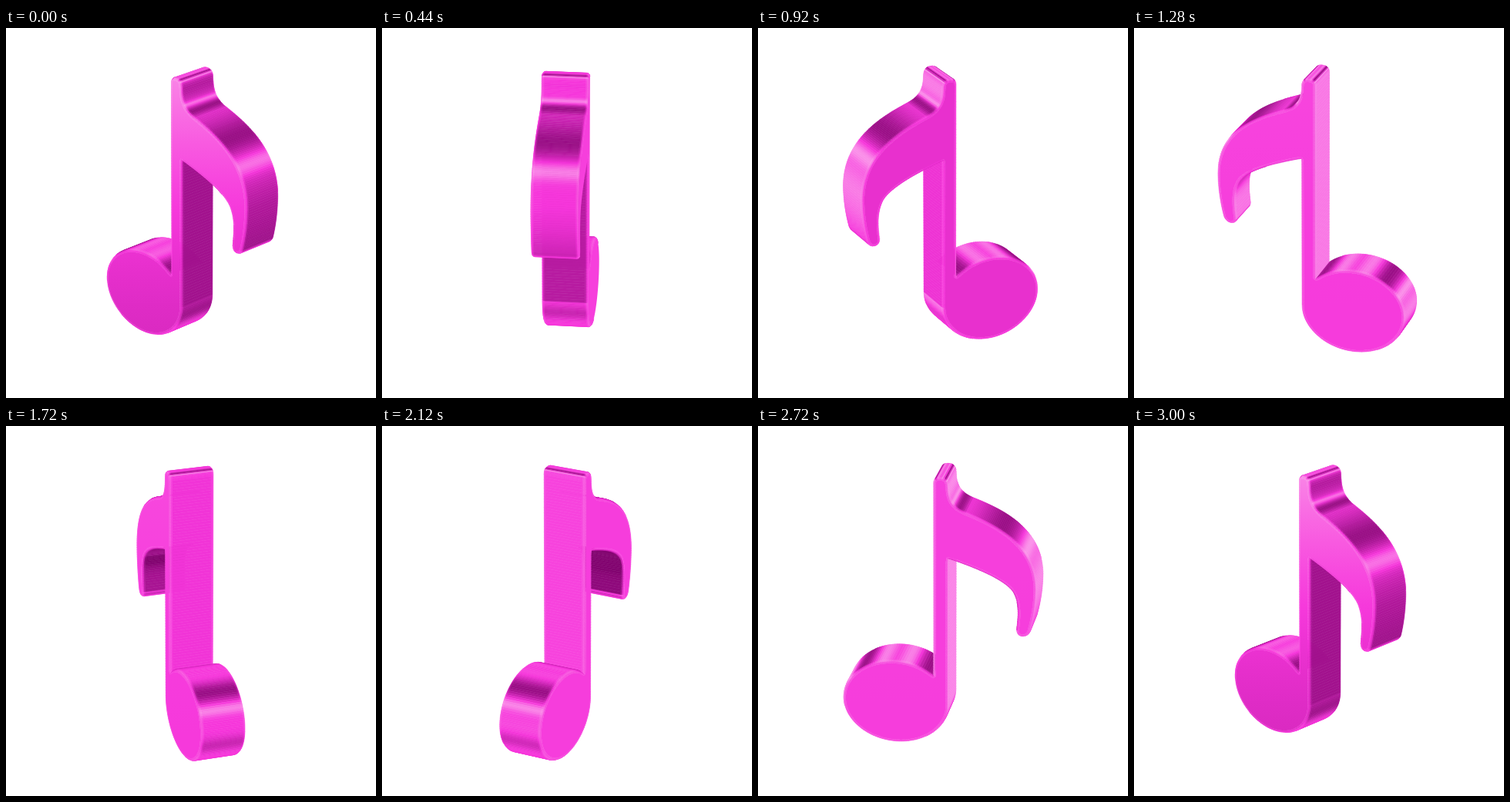
An HTML page with a canvas that plays this animation: 480x480 px, repeating every 3040 ms.

```html
<!DOCTYPE html>
<html lang="en">
<head>
<meta charset="utf-8">
<title>Turning note</title>
<style>
  html, body { margin: 0; width: 100%; height: 100%; overflow: hidden; background: #fff; }
  canvas { display: block; width: 480px; height: 480px; }
</style>
</head>
<body>
<canvas id="stage" width="480" height="480"></canvas>
<script>
const ctx = document.getElementById('stage').getContext('2d');
const LOOP = 3040, STEP = 40, TURN = 3000, START = -43.9;
const CX = 239, CY = 240, HALF = 30.2, BEVEL = 3.5, DISTANCE = 4000;
const RAD = Math.PI / 180;
const SIN = Math.sin(22 * RAD), COS = Math.cos(22 * RAD); // camera looks down
const clamp = (x, a = 0, b = 1) => Math.min(b, Math.max(a, x));
const mix = (a, b, t) => a + (b - a) * t;
const bump = (x, width) => Math.exp(-((x / width) ** 2));

// 0 is deep purple, 0.5 the body pink, 1 the pale highlight.
const DARK = [130, 4, 112], PINK = [246, 54, 219], PALE = [253, 205, 242];
function colour(level) {
  const l = clamp(level) * 2;
  const [from, to] = l < 1 ? [DARK, PINK] : [PINK, PALE];
  return `rgb(${from.map((v, i) => Math.round(mix(v, to[i], l < 1 ? l : l - 1))).join()})`;
}

// Outline, clockwise; heights are already foreshortened, shade marks hollows.
const outline = [];
let pen = [-6.3, 313];
function curve(n, x1, y1, x2, y2, x3, y3, shade = 0) {
  const [x0, y0] = pen;
  const at = (a, b, c, d, t) =>
    (1 - t) ** 3 * a + 3 * (1 - t) ** 2 * t * b + 3 * (1 - t) * t * t * c + t ** 3 * d;
  for (let i = 0; i < n; i++) {
    outline.push({ u: at(x0, x1, x2, x3, i / n), y: at(y0, y1, y2, y3, i / n), shade });
  }
  pen = [x3, y3];
}
function line(n, x, y, shade) {
  const [x0, y0] = pen;
  curve(n, mix(x0, x, 1 / 3), mix(y0, y, 1 / 3), mix(x0, x, 2 / 3), mix(y0, y, 2 / 3), x, y, shade);
}
line(70, -6.3, 69);
curve(10, -6.3, 62, -2, 60.5, 3.6, 60.5);
curve(10, 9.5, 60.5, 13.4, 63, 13.6, 73);
curve(20, 14, 90, 22, 97, 36, 102);
curve(60, 72, 114, 126, 134, 127.6, 193);
curve(20, 127.6, 215, 124, 233, 120.5, 246);
curve(14, 118, 257.5, 102, 258.5, 102, 247);
curve(16, 104.5, 228, 105, 212, 97, 199, 0.5);
curve(26, 86, 184, 50, 172, 13.6, 162, 0.5);
line(54, 13.6, 351, 0.25);
for (let i = 0, n = 120; i <= n; i++) {
  const a = (Math.PI * 2 - 0.78) * i / n;
  outline.push({ u: -56.4 + 70 * Math.cos(a), y: 351 + 53.5 * Math.sin(a), shade: 0 });
}

const unit = (u, v) => {
  const len = Math.hypot(u, v) || 1;
  return { nu: u / len, nv: v / len };
};
const walls = outline.map((p, i) => {
  const q = outline[(i + 1) % outline.length];
  return { p, q, ...unit((q.y - p.y) / COS, q.u - p.u), shade: p.shade };
});
outline.forEach((p, i) => {
  const a = walls.at(i - 1), b = walls[i];
  Object.assign(p, unit(a.nu + b.nu, a.nv + b.nv));
});

// Rounded cross-section of the rim, from the back face to the front face.
const rim = [];
for (const end of [-1, 1]) {
  for (let i = 0; i <= 3; i++) {
    const tilt = (end < 0 ? i - 3 : i) * 30;
    rim.push({
      tilt,
      w: end * (HALF - BEVEL) + BEVEL * Math.sin(tilt * RAD),
      inset: BEVEL * (1 - Math.cos(tilt * RAD))
    });
  }
}

// Glossy bands follow the slope of a wall, the general light its heading.
function wallTone(nx, ny, nz, shade) {
  const rise = Math.asin(clamp(ny, -1, 1)) / RAD;
  const heading = Math.atan2(nx, nz) / RAD;
  const side = Math.sin(heading * RAD) ** 2;
  const light = 0.3 * side - 0.42 * bump(heading - 46, 16);
  return 0.5 + light * bump(rise, 28)
    + 0.26 * bump(rise - 35, 8) - 0.4 * bump(rise - 58, 13)
    + 0.28 * side * bump(rise - 78, 9) - 0.2 * bump(rise + 20, 14)
    - shade * (1 - clamp(nx));
}

// The flat face: a little dull towards the right, a strong fade at the left.
function faceTone(heading, y) {
  const down = (y - 70) / 330;
  return 0.53 - 0.09 * bump(heading - 28, 20)
    + bump(heading + 45, 18) * (0.22 * (1 - down) ** 2 - 0.15 * down);
}

function draw(time) {
  const turn = (START - 360 * time / TURN) * RAD;
  const s = Math.sin(turn), c = Math.cos(turn);
  const front = c >= 0 ? 1 : -1;
  const heading = Math.atan2(s * front, c * front) / RAD;

  const spot = (p, { w, inset }) => {
    const u = p.u - p.nu * inset, y = p.y + p.nv * inset * COS - CY;
    const z = w * c - u * s;
    const zoom = 1 / (1 - (z * COS - y / COS * SIN) / DISTANCE);
    return [CX + (u * c + w * s) * zoom, CY + (y + z * SIN) * zoom];
  };
  const trace = pts => {
    ctx.beginPath();
    pts.forEach(([x, y]) => ctx.lineTo(x, y));
    ctx.closePath();
  };
  const depth = ({ p, q }) => -(p.u + q.u) * s * COS - (p.y + q.y) / COS * SIN;

  ctx.fillStyle = '#fff';
  ctx.fillRect(0, 0, 480, 480);
  ctx.lineJoin = 'round';
  ctx.lineWidth = 0.6;

  const strips = front > 0 ? rim : [...rim].reverse();
  for (const wall of [...walls].sort((a, b) => depth(a) - depth(b))) {
    const { p, q, nu, nv, shade } = wall;
    const tone = wallTone(nu * c, nv, -nu * s, shade);
    for (let i = 1; i < strips.length; i++) {
      const a = strips[i - 1], b = strips[i];
      const tilt = (a.tilt + b.tilt) / 2 * RAD;
      const flat = Math.cos(tilt), out = Math.sin(tilt);
      const towards = (nv * SIN - nu * s * COS) * flat + c * COS * out;
      if (towards <= 0) continue;
      const [x, y] = spot(p, a);
      trace([[x, y], spot(q, a), spot(q, b), spot(p, b)]);
      const blend = mix(tone, faceTone(heading, y), out * out);
      ctx.fillStyle = ctx.strokeStyle = colour(blend + 0.1 * Math.abs(Math.sin(2 * tilt)));
      ctx.fill();
      ctx.stroke();
    }
  }

  const paint = ctx.createLinearGradient(0, 70, 0, 400);
  for (let i = 0; i <= 8; i++) {
    paint.addColorStop(i / 8, colour(faceTone(heading, 70 + 330 * i / 8)));
  }
  trace(outline.map(p => spot(p, strips[strips.length - 1])));
  ctx.fillStyle = paint;
  ctx.fill();
}

const begin = performance.now();
function tick() {
  const t = (performance.now() - begin) % LOOP;
  draw(Math.floor(t / STEP) * STEP);
  requestAnimationFrame(tick);
}
tick();
</script>
</body>
</html>
```
